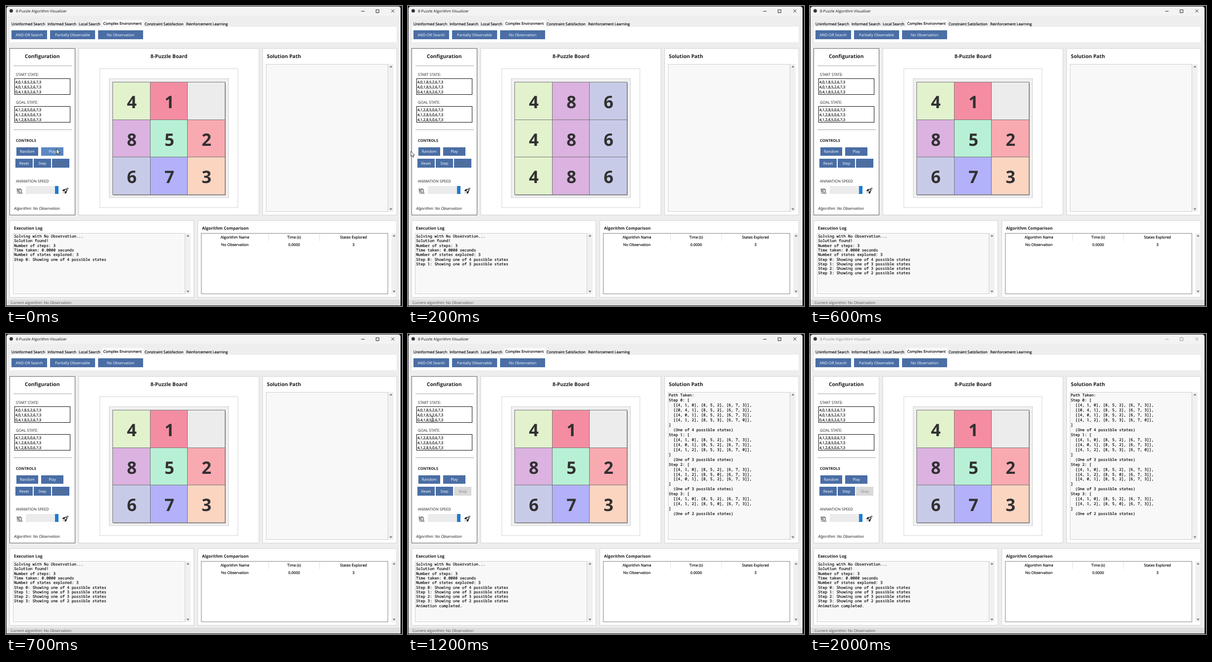
These frames come from a looping animation (800 by 605 pixels, 2.1 s). An HTML page:

```html
<!DOCTYPE html>
<html lang="en">
<head>
<meta charset="utf-8">
<title>8-Puzzle Algorithm Visualizer</title>
<style>
  html, body { margin: 0; width: 100%; height: 100%; overflow: hidden; background: #16161c; }
  svg { display: block; }
  text { font-family: "Open Sans", "Noto Sans", sans-serif; white-space: pre; text-rendering: geometricPrecision; }
  .mono { font-family: "Noto Sans Mono", "DejaVu Sans Mono", monospace; }
  .crisp { stroke: #000; stroke-width: .18px; }
</style>
</head>
<body>
<svg id="stage" width="800" height="605" viewBox="0 0 800 605"></svg>
<script>
const STEP = 100, FRAMES = 21;
const BLUE = '#4a6ea5', INK = '#1c1c1c', EDGE = '#d2d2d4';

const tileColors = ['#ececed', '#f58da2', '#f9aab1', '#fbd5c0', '#e2f2cd', '#b8f0d6', '#c8cbe8', '#b2b1f9', '#dbb2e0'];
const solvedView = [4, 1, 0, 8, 5, 2, 6, 7, 3];
const repeatView = [4, 8, 6, 4, 8, 6, 4, 8, 6];

// Belief states of each step, as row-major digits
const path = [
  ['410852673', '041852673', '401852673', '412853670'],
  ['410852673', '401852673', '412853670'],
  ['410852673', '412850673', '401852673'],
  ['410852673', '412850673']
];

const box = (x1, y1, x2, y2, fill, stroke = 'none', extra = '') =>
  `<rect x="${x1}" y="${y1}" width="${x2 - x1}" height="${y2 - y1}" fill="${fill}" stroke="${stroke}" ${extra}/>`;
const line = (d, stroke, width = 1, fill = 'none') =>
  `<path d="${d}" fill="${fill}" stroke="${stroke}" stroke-width="${width}"/>`;
const text = (s, x, y, size = 7.6, fill = INK, extra = '') =>
  `<text x="${x}" y="${y}" font-size="${size}" fill="${fill}" ${extra}>${s}</text>`;
const mid = (s, x, y, size, fill, extra = '') => text(s, x, y, size, fill, 'text-anchor="middle" ' + extra);
const bold = 'font-weight="700"', crisp = 'class="crisp"';
const mono = (rows, x, y, gap) =>
  rows.map((s, i) => text(s, x, y + i * gap, 7.77, '#000', 'class="mono crisp"')).join('');
const button = (s, x1, y1, x2, y2, fill = BLUE, ink = '#fff') =>
  box(x1, y1, x2, y2, fill) + mid(s, (x1 + x2) / 2, (y1 + y2) / 2 + 2.7, 7.6, ink);
const panel = (x1, y1, x2, y2, edge = EDGE) => box(x1, y1, x2, y2, '#fff', edge);

function scrollbar(x, y1, y2) {
  const c = x + 5.5;
  return box(x, y1, x + 11, y2, '#f0f0f0') +
    line(`M${c - 3} ${y1 + 7}h6l-3 -4z`, 'none', 0, '#858585') +
    line(`M${c - 3} ${y2 - 7}h6l-3 4z`, 'none', 0, '#858585');
}

function titleBar(active) {
  const ink = active ? '#111' : '#8c8c8c';
  return box(1, 1, 797, 20, '#f3f3f3', 'none', 'rx="5"') +
    '<circle cx="10.5" cy="9.8" r="3.5" fill="#30343c"/>' +
    text('8-Puzzle Algorithm Visualizer', 20, 13.2, 7.68, ink) +
    line('M717.5 10.5h7M747.5 7.5h6v6h-6zM778.5 7l6 6m0 -6l-6 6', ink, 0.9);
}

function tabs() {
  const names = [['Uninformed Search', 11], ['Informed Search', 84], ['Local Search', 147],
    ['Complex Environment', 196.5], ['Constraint Satisfaction', 280], ['Reinforcement Learning', 364]];
  return box(8, 42, 789, 73, '#fff') + box(194, 28, 278, 43, '#fafafa') +
    names.map(([s, x], i) => text(s, x, i === 3 ? 38 : 39, 7.5, '#000', crisp)).join('') +
    button('AND-OR Search', 11, 49, 83, 67) +
    button('Partially Observable', 89, 49, 180, 67) +
    button('No Observation', 186, 49, 277, 67);
}

function config(hover, done, active) {
  const states = (rows, y) => box(17.5, y - 9.5, 129.5, y + 22.5, '#fff', '#111') +
    rows.map((s, i) => text(s.split('').join(','), 19, y + i * 10, 7.36, '#000', crisp)).join('');
  return panel(7.5, 85.5, 139.5, 421.5, active ? '#626266' : EDGE) +
    mid('Configuration', 73.2, 105.3, 10.25, INK, bold) +
    line('M15 120.5H133M15 249.5H133', '#a6a6a6') +
    text('START STATE:', 20, 141, 7.7) +
    states(['401852673', '401852673', '041852673'], 156) +
    text('GOAL STATE:', 20, 197, 7.7) +
    states(['412850673', '412850673', '412850673'], 212) +
    text('CONTROLS', 20, 274, 7.6, INK, bold) +
    button('Random', 21, 285, 65, 302) +
    button('Play', 71, 285, 116, 302, hover ? '#5b87c2' : BLUE) +
    button('Reset', 19, 308, 54, 326) +
    button('Step', 56, 308, 91, 326) +
    button('Stop', 93, 308, 128, 326, done ? '#d9d9d9' : BLUE, done ? '#858585' : '#6e6e6e') +
    text('ANIMATION SPEED', 20, 355.5, 7.65) +
    box(40, 363, 106, 379, '#ebebeb') + box(99, 363, 106, 379, '#1a7dd4') +
    snail() + rocket() +
    text('Algorithm: No Observation', 16.5, 411, 7.9, INK, 'font-style="italic"');
}

const snail = () =>
  '<circle cx="28" cy="372.3" r="3.8" fill="none" stroke="#222" stroke-width=".9"/>' +
  line('M21.500 368.500l1.300 2.500v4.500q0 2.500 2.500 2.500h7.500q-.5 -1.800 -2.300 -2.800M24 367.500l-1 3.200M28 374.300q-2 0 -2 -2t2 -2t1.500 2', '#222', 0.8);

const rocket = () =>
  line('M125.500 367q-5 0 -8 6l2 2q6 -3 6 -8z', '#222', 1) +
  line('M119 369.500l-3 .5l-2 3h3.500zM122.500 373l-.5 3.500l-3 2v-3.500zM117 375l-2.500 2.500', '#222', 0.7, '#222') +
  '<circle cx="122" cy="370.5" r="1.2" fill="#222"/>';

function board(cells) {
  const size = 75.67, at = (start, i) => start + Math.round(i * size);
  const tiles = cells.map((n, i) => {
    const col = i % 3, row = Math.floor(i / 3), x = at(215.5, col), y = at(153.5, row);
    return box(x, y, at(215.5, col + 1), at(153.5, row + 1), tileColors[n], '#757575') +
      (n ? mid(n, x + size / 2 + 0.7, y + 52.7, 34.5, '#303030', bold) : '');
  });
  return panel(147, 85.5, 511, 421.5) +
    mid('8-Puzzle Board', 329.2, 105.3, 10.25, INK, bold) +
    box(189.5, 126.5, 468.5, 406.5, '#fff', '#d6d6dc') +
    box(208.5, 146.5, 449.5, 386.5, '#f0f0f1', '#d0d0d3') +
    box(217, 155, 444, 382, '#a0a0a2') + tiles.join('');
}

function solution(done) {
  const rows = ['Path Taken:'];
  path.forEach((states, i) => {
    rows.push(`Step ${i}: [`);
    states.forEach(s => rows.push('  [' +
      s.match(/.../g).map(r => `[${r.split('').join(', ')}]`).join(', ') + '],'));
    rows.push(']', `  (One of ${states.length} possible states)`);
  });
  return panel(518.5, 85.5, 789.5, 421.5) +
    text('Solution Path', 527, 105.3, 10.25, INK, bold) +
    box(525.5, 117.5, 771.5, 414.5, '#f8f8f8', '#cfcfcf') + scrollbar(772, 117, 415) +
    (done ? mono(rows, 526.7, 126.3, 9.95) : '');
}

function log(step, done) {
  const rows = ['Solving with No Observation...', 'Solution found!', 'Number of steps: 3',
    'Time taken: 0.0000 seconds', 'Number of states explored: 3'];
  for (let i = 0; i <= step; i++) rows.push(`Step ${i}: Showing one of ${path[i].length} possible states`);
  if (done) rows.push('Animation completed.');
  return panel(7.5, 432.5, 379.5, 587.5) +
    text('Execution Log', 16, 450.5, 8.4, INK, bold) +
    box(14.5, 458.5, 361.5, 580.5, '#f8f8f8', '#cfcfcf') + scrollbar(362, 458, 581) +
    mono(rows, 16.2, 467, 9.3);
}

function comparison() {
  const columns = [['Algorithm Name', 'No Observation', 462.5], ['Time (s)', '0.0000', 582], ['States Explored', '3', 702]];
  const cell = (s, x, y) => mid(s, x, y, 7.55, '#000', crisp);
  return panel(387.5, 432.5, 789.5, 587.5) +
    text('Algorithm Comparison', 396, 450.5, 8.35, INK, bold) +
    box(394.5, 458.5, 771.5, 580.5, '#fff', '#85858a') + scrollbar(778.5, 458, 581) +
    line('M530.5 460V474M633.5 460V474', '#e0e0e0') +
    columns.map(([head, value, x]) => cell(head, x, 469) + cell(value, x, 483.7)).join('');
}

function pointer(frame) {
  if (frame <= 2) {
    const x = 102 - 48 * frame, y = 288 + 2.5 * frame;
    return line(`M${x} ${y}v10.500l2.400 -2.200l1.700 3.700l1.700 -.8l-1.600 -3.500h3.200z`, '#111', 0.8, '#fff');
  }
  return frame === 12 ? line('M46.500 165.500h1.500l1 1l1 -1h1.500M49 166.500v9M46.500 176.500h1.500l1 -1l1 1h1.500', '#111', 0.9) : '';
}

function scene(frame) {
  const step = Math.min(3, Math.floor(frame / 2));
  const done = frame >= 8, active = frame < 20;
  const view = step === 1 || step === 2 ? repeatView : solvedView;
  return box(0, 0, 800, 605, '#16161c') +
    box(1, 1, 797, 604, '#eeeeef', 'none', 'rx="5"') +
    titleBar(active) + tabs() + config(frame === 0, done, active) + board(view) +
    solution(done) + log(step, done) + comparison() +
    box(1, 592, 797, 604, '#dedede') +
    text('Current algorithm: No Observation', 9, 601, 7.6, '#555') +
    pointer(frame);
}

const stage = document.getElementById('stage');
let shown = -1;
function draw() {
  const frame = Math.floor(performance.now() / STEP) % FRAMES;
  if (frame !== shown) stage.innerHTML = scene(shown = frame);
  requestAnimationFrame(draw);
}
draw();
</script>
</body>
</html>
```
